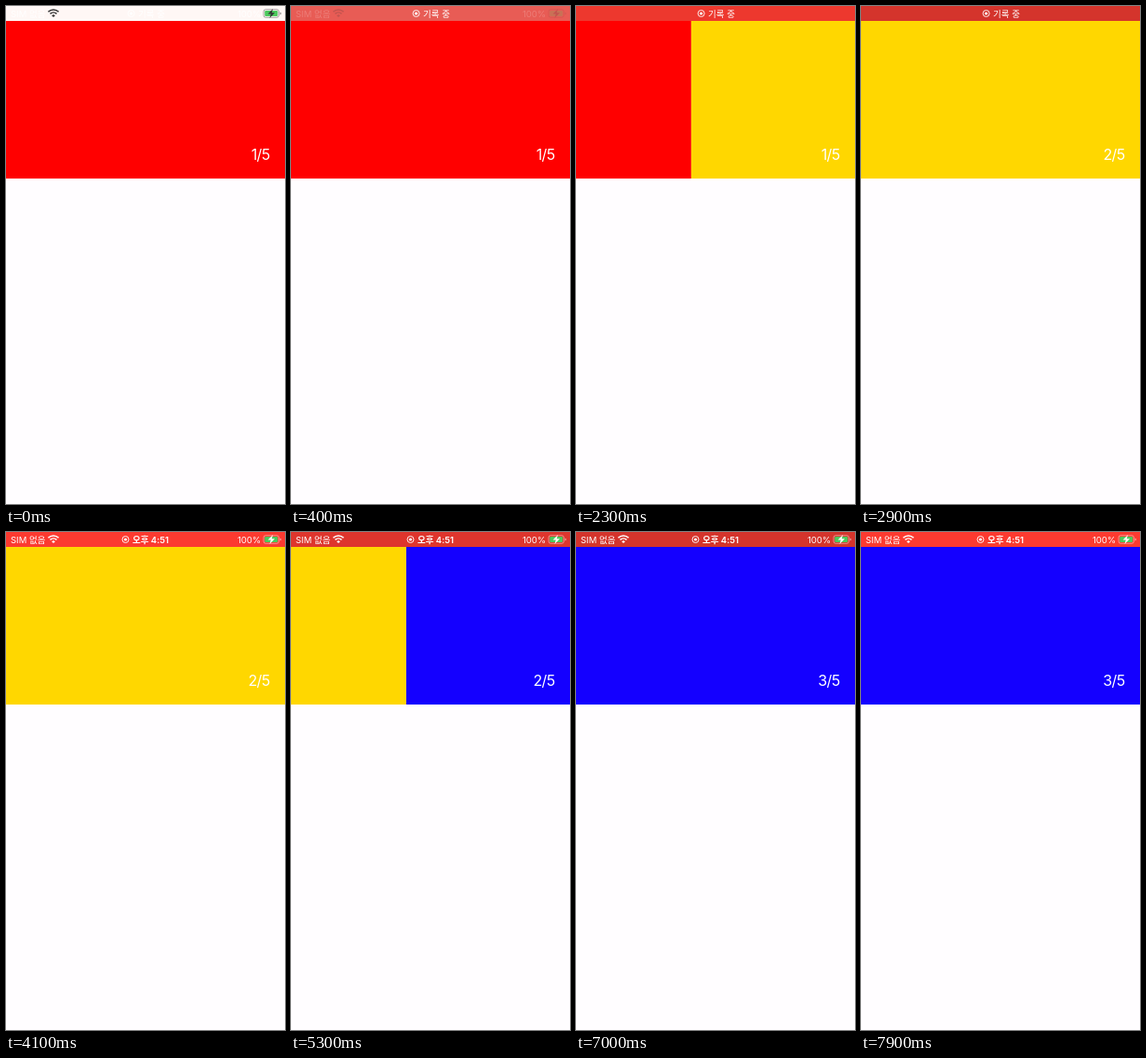
Animation, 300 px wide and 534 px high, one loop 8 s. Source, as an HTML page:

```html
<!DOCTYPE html>
<html lang="ko">
<head>
<meta charset="utf-8">
<style>
  html, body { margin: 0; width: 100%; height: 100%; overflow: hidden; background: #fffdff; }
  svg { display: block; width: 300px; height: 534px; }
  text { font-family: Inter, "Noto Sans CJK KR", "Noto Sans CJK", sans-serif; fill: #fff; }
  .status text { font-size: 9.5px; }
  .time text { font-weight: 600; }
  .ring { fill: none; stroke: #fff; stroke-width: .9; }
  #count { font-size: 16px; letter-spacing: -.6px; text-anchor: end; }
</style>
</head>
<body>
<svg viewBox="0 0 300 534">
  <rect width="300" height="534" fill="#fffdff"/>
  <g id="pages">
    <rect y="16" width="300" height="169" fill="#f00"/>
    <rect x="300" y="16" width="300" height="169" fill="#ffd700"/>
    <rect x="600" y="16" width="300" height="169" fill="#1400ff"/>
  </g>
  <text id="count" x="283.6" y="165.3">1/5</text>

  <rect id="bar" width="300" height="16"/>
  <g class="status">
    <g id="sides">
      <text x="5" y="11.6">SIM 없음</text>
      <g class="ink" fill="none" stroke="currentColor" stroke-width="1.6">
        <path d="M45.4 6.3a8 8 0 0 1 11.2 0M47.5 8.4a5 5 0 0 1 7 0"/>
        <path d="M51 12.1l-1.9-1.9a2.7 2.7 0 0 1 3.8 0z" fill="currentColor" stroke="none"/>
      </g>
      <text x="249" y="11.6">100%</text>
      <g class="ink">
        <rect x="277" y="3.7" width="16.4" height="8.6" rx="2.3" fill="none"
              stroke="currentColor" stroke-opacity=".55" stroke-width=".8"/>
        <rect x="278.2" y="4.9" width="14" height="6.2" rx="1.3" fill="#4cc95c"/>
        <path d="M294.6 6.6q1.3.2 1.3 1.4t-1.3 1.4z" fill="currentColor" fill-opacity=".6"/>
        <path d="M287 3l-5.4 5.6h3.2L283.400 13l5.600-5.800h-3.300z" fill="currentColor"/>
      </g>
    </g>
    <g id="rec">
      <circle class="ring" cx="134.600" cy="8" r="3.500"/>
      <circle cx="134.600" cy="8" r="1.600" fill="#fff"/>
      <text x="142" y="11.500">기록 중</text>
    </g>
    <g id="clock" class="time">
      <circle class="ring" cx="128.500" cy="8" r="3.500"/>
      <circle cx="128.500" cy="8" r="1.600" fill="#fff"/>
      <text x="136" y="11.600">오후 4:51</text>
    </g>
  </g>
</svg>
<script>
  const LOOP = 8000;
  const SLIDES = [1960, 4960], SLIDE_MS = 625;
  const PULSE_MS = 2080, PULSE_PEAK = 1840;
  const WHITE = [255, 247, 245], BRIGHT = [255, 58, 48], DARK = [212, 52, 44];

  const $ = id => document.getElementById(id);
  const pages = $('pages'), count = $('count'), bar = $('bar');
  const sides = $('sides'), rec = $('rec'), clock = $('clock');
  const icons = document.querySelectorAll('.ink');

  const ramp = (t, start, length) => Math.min(1, Math.max(0, (t - start) / length));
  const ease = p => p < .5 ? 2 * p * p : 1 - 2 * (1 - p) ** 2;
  const mix = (a, b, p) => a.map((v, i) => v + (b[i] - v) * p);
  const rgb = c => `rgb(${c.map(Math.round).join(',')})`;

  function draw(t) {
    const offset = SLIDES.reduce((sum, s) => sum + ease(ramp(t, s, SLIDE_MS)), 0);
    pages.setAttribute('transform', `translate(${-300 * offset} 0)`);
    count.textContent = `${1 + SLIDES.filter(s => t >= s + SLIDE_MS).length}/5`;

    const glow = (1 + Math.cos((t - PULSE_PEAK) / PULSE_MS * 2 * Math.PI)) / 2;
    const red = mix(DARK, BRIGHT, glow);
    bar.setAttribute('fill', rgb(mix(WHITE, red, ramp(t, 0, 500))));

    const swap = ramp(t, 3050, 350);
    sides.setAttribute('opacity', t < 2000 ? 1 - ramp(t, 0, 500) : swap);
    rec.setAttribute('opacity', 1 - swap);
    clock.setAttribute('opacity', swap);
    icons.forEach(g => g.setAttribute('color', t < 2000 ? '#333' : '#fff'));
  }

  const origin = performance.now();
  function tick() {
    draw((performance.now() - origin) % LOOP);
    requestAnimationFrame(tick);
  }
  tick();
</script>
</body>
</html>
```
